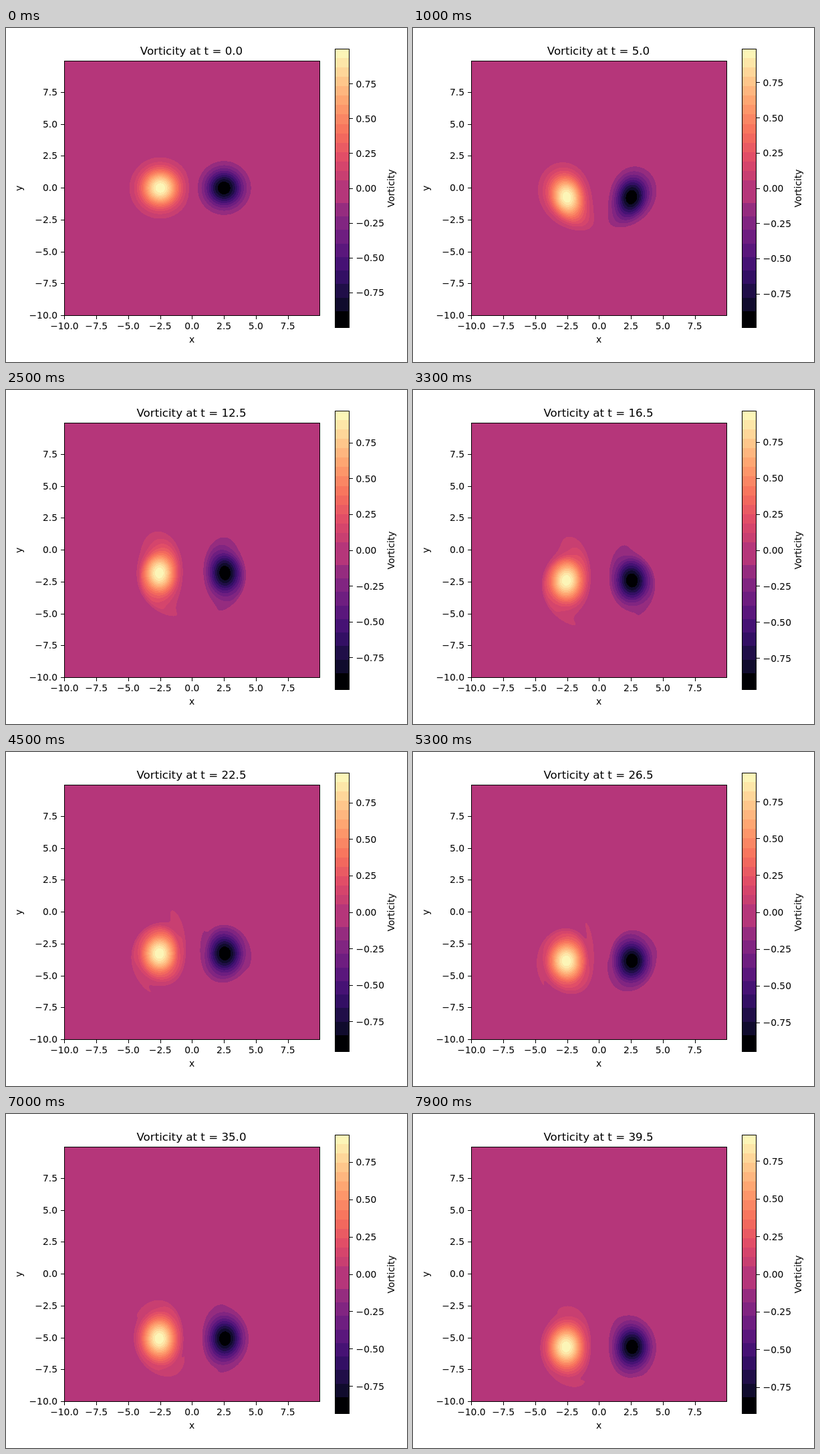
An HTML page with a canvas that plays this animation: 600 px wide and 500 px high, repeating every 8000 ms.

```html
<!DOCTYPE html>
<html>
<head>
<meta charset="utf-8">
<style>
html, body { margin: 0; width: 100%; height: 100%; overflow: hidden; background: #fff; }
canvas { display: block; }
</style>
</head>
<body>
<canvas id="stage" width="600" height="500"></canvas>
<script>
const ctx = document.getElementById('stage').getContext('2d');
const N = 256, MASK = N - 1, SIZE = 20, DX = SIZE / N, DT = 0.5, NU = 0.001;
const FRAMES = 80, FRAME_MS = 100, SPEED = 0.1445;
const UNIT = 19.1, LEFT = 87, TOP = 49, W = 383, H = 382;
const BAR = { x: 492, w: 21, top: 31, bottom: 448, mid: 239.5 };
const BAR_H = BAR.bottom - BAR.top;

// ---- Fourier transform on the periodic grid ----
const COS = new Float64Array(N / 2).map((_, i) => Math.cos(2 * Math.PI * i / N));
const SIN = new Float64Array(N / 2).map((_, i) => Math.sin(2 * Math.PI * i / N));
const REV = new Uint16Array(N);
for (let i = 1; i < N; i++) REV[i] = (REV[i >> 1] >> 1) | (i & 1 ? N / 2 : 0);

function fftLine(re, im, start, stride, dir) {
  for (let i = 0; i < N; i++) {
    if (REV[i] <= i) continue;
    const a = start + i * stride, b = start + REV[i] * stride;
    const r = re[a], m = im[a];
    re[a] = re[b]; im[a] = im[b];
    re[b] = r; im[b] = m;
  }
  for (let len = 2; len <= N; len *= 2) {
    const half = len / 2, skip = N / len;
    for (let k = 0; k < half; k++) {
      const c = COS[k * skip], s = dir * SIN[k * skip];
      for (let i = k; i < N; i += len) {
        const a = start + i * stride, b = a + half * stride;
        const r = re[b] * c - im[b] * s, m = re[b] * s + im[b] * c;
        re[b] = re[a] - r; im[b] = im[a] - m;
        re[a] += r; im[a] += m;
      }
    }
  }
}

function fft2(re, im, dir) {
  for (let i = 0; i < N; i++) fftLine(re, im, i * N, 1, dir);
  for (let i = 0; i < N; i++) fftLine(re, im, i, N, dir);
}

const wave = i => (i < N / 2 ? i : i - N) * 2 * Math.PI / SIZE;

// Velocity from vorticity; both components share one complex inverse transform.
function velocity(w) {
  const u = Float64Array.from(w), v = new Float64Array(N * N);
  fft2(u, v, -1);
  for (let j = 0, p = 0; j < N; j++) {
    const ky = wave(j);
    for (let i = 0; i < N; i++, p++) {
      const kx = wave(i), k2 = kx * kx + ky * ky;
      const f = k2 ? -1 / (k2 * N * N) : 0, r = u[p], m = v[p];
      u[p] = f * (kx * r - ky * m);
      v[p] = f * (kx * m + ky * r);
    }
  }
  fft2(u, v, 1);
  return { u, v };
}

// ---- Sampling ----
function linear(f, x, y) {
  const i = Math.floor(x), j = Math.floor(y), a = x - i, b = y - j;
  const i0 = i & MASK, i1 = (i + 1) & MASK, j0 = (j & MASK) * N, j1 = ((j + 1) & MASK) * N;
  return (1 - b) * ((1 - a) * f[j0 + i0] + a * f[j0 + i1])
    + b * ((1 - a) * f[j1 + i0] + a * f[j1 + i1]);
}

const spline = (p, q, r, s, t) =>
  q + 0.5 * t * (r - p + t * (2 * p - 5 * q + 4 * r - s + t * (3 * (q - r) + s - p)));

function cubic(f, x, y) {
  const i = Math.floor(x), j = Math.floor(y), t = x - i;
  const a = (i - 1) & MASK, b = i & MASK, c = (i + 1) & MASK, d = (i + 2) & MASK;
  const row = n => {
    const o = ((j + n) & MASK) * N;
    return spline(f[o + a], f[o + b], f[o + c], f[o + d], t);
  };
  return spline(row(-1), row(0), row(1), row(2), y - j);
}

// ---- Simulation: trace back along the flow, then diffuse ----
let flow = null;

function advance(w) {
  const now = velocity(w), old = flow || now;
  flow = now;
  const u = now.u.map((a, p) => 1.5 * a - 0.5 * old.u[p]);
  const v = now.v.map((a, p) => 1.5 * a - 0.5 * old.v[p]);
  const c = DT / DX, moved = new Float32Array(N * N), next = new Float32Array(N * N);
  for (let j = 0, p = 0; j < N; j++) {
    for (let i = 0; i < N; i++, p++) {
      const x = i - 0.5 * c * u[p], y = j - 0.5 * c * v[p];
      moved[p] = cubic(w, i - c * linear(u, x, y), j - c * linear(v, x, y));
    }
  }
  const mix = NU * DT / (DX * DX);
  for (let j = 0, p = 0; j < N; j++) {
    const up = ((j + 1) & MASK) * N, down = ((j - 1) & MASK) * N;
    for (let i = 0; i < N; i++, p++) {
      const sum = moved[up + i] + moved[down + i]
        + moved[j * N + ((i + 1) & MASK)] + moved[j * N + ((i - 1) & MASK)];
      next[p] = moved[p] + mix * (sum - 4 * moved[p]);
    }
  }
  return next;
}

function start() {
  return new Float32Array(N * N).map((_, p) => {
    const x = (p % N) * DX - 10, y = Math.floor(p / N) * DX - 10;
    const blob = cx => Math.exp(-((x - cx) ** 2 + y * y) / 2);
    return blob(-2.5) - blob(2.5);
  });
}

// Peak value and height of the vortex cores.
function measure(w) {
  let max = 0, sum = 0, moment = 0;
  for (let p = 0; p < N * N; p++) {
    max = Math.max(max, w[p]);
    const g = w[p] ** 8;
    sum += g;
    moment += g * (Math.floor(p / N) * DX - 10);
  }
  return { w, max, core: moment / sum };
}

const states = [measure(start())];

function state(k) {
  while (states.length <= k) states.push(measure(advance(states[states.length - 1].w)));
  return states[k];
}

// ---- Colours: magma cut into bands ----
const MAGMA = ['000004', '140e36', '3b0f70', '641a80', '8c2981', 'b73779',
  'de4968', 'f7705c', 'fe9f6d', 'fecf92', 'fcfdbf']
  .map(h => [0, 2, 4].map(i => parseInt(h.substr(i, 2), 16)));

function magma(t) {
  const i = Math.min(9, Math.floor(t * 10)), f = t * 10 - i;
  return MAGMA[i].map((a, c) => Math.round(a + (MAGMA[i + 1][c] - a) * f));
}

function bandColor(y) {
  if (y >= 424) return [0, 0, 3];
  if (y >= 228 && y < 262) return [181, 54, 122];
  const [from, step] = y < 228 ? [31, 197 / 14] : [262, 162 / 8];
  const centre = from + (Math.floor((y - from) / step) + 0.5) * step;
  return magma((BAR.bottom - centre) / BAR_H);
}

const FINE = 8;
const LUT = new Uint32Array(BAR_H * FINE + 1).map((_, i) => {
  const [r, g, b] = bandColor(BAR.bottom - i / FINE);
  return (255 << 24) | (b << 16) | (g << 8) | r;
});

// ---- Drawing ----
const image = ctx.createImageData(W, H);
const pixels = new Uint32Array(image.data.buffer);

function text(s, x, y, align = 'center', size = 13.89) {
  ctx.font = size + 'px "DejaVu Sans", sans-serif';
  ctx.textAlign = align;
  ctx.fillText(s, x, y);
}

function upright(s, x, y) {
  ctx.save();
  ctx.translate(x, y);
  ctx.rotate(-Math.PI / 2);
  text(s, 0, 0);
  ctx.restore();
}

const label = (v, digits) => v.toFixed(digits).replace('-', '\u2212');

function drawField({ w, max, core }, t) {
  const shift = -SPEED * t - core, last = LUT.length - 1, scale = 1 / (UNIT * DX);
  for (let r = 0, p = 0; r < H; r++) {
    const y = (H - 1 - r) * scale - shift / DX;
    for (let i = 0; i < W; i++, p++) {
      const n = 0.5 + 0.5 * linear(w, i * scale, y) / max;
      pixels[p] = LUT[Math.max(0, Math.min(last, Math.round(n * last)))];
    }
  }
  ctx.putImageData(image, LEFT, TOP);
}

function drawAxes() {
  ctx.strokeRect(LEFT + 0.5, TOP + 0.5, W - 1, H - 1);
  for (let i = 0; i < 8; i++) {
    const d = i * 2.5 * UNIT, s = label(i * 2.5 - 10, 1);
    const x = LEFT + 0.4 + d, y = TOP + H - 1 - d;
    ctx.fillRect(Math.round(x), TOP + H, 1, 5);
    ctx.fillRect(LEFT - 5, Math.round(y), 5, 1);
    text(s, x, 451);
    text(s, 77, y + 5, 'right');
  }
  text('x', 278, 471);
  upright('y', 24, 240);
}

function drawBar(max) {
  for (let y = BAR.top; y < BAR.bottom; y++) {
    ctx.fillStyle = `rgb(${bandColor(y + 0.5)})`;
    ctx.fillRect(BAR.x, y, BAR.w, 1);
  }
  ctx.fillStyle = '#000';
  ctx.strokeRect(BAR.x + 0.5, BAR.top + 0.5, BAR.w, BAR_H);
  for (let i = -3; i <= 3; i++) {
    const y = BAR.mid - i * 0.25 / max * BAR_H / 2;
    ctx.fillRect(BAR.x + BAR.w + 1, Math.round(y), 5, 1);
    text(label(i * 0.25, 2), 523.5, y + 5.5, 'left');
  }
  upright('Vorticity', 581, 240);
}

function draw(k) {
  const s = state(k), t = k * DT;
  ctx.fillStyle = '#fff';
  ctx.fillRect(0, 0, 600, 500);
  drawField(s, t);
  ctx.fillStyle = ctx.strokeStyle = '#000';
  ctx.lineWidth = 1;
  text('Vorticity at t = ' + t.toFixed(1), 277.5, 40, 'center', 16.67);
  drawAxes();
  drawBar(s.max);
}

let shown = -1;
function tick() {
  const k = Math.floor(performance.now() / FRAME_MS) % FRAMES;
  if (k !== shown) draw(shown = k);
  requestAnimationFrame(tick);
}
tick();
</script>
</body>
</html>
```
